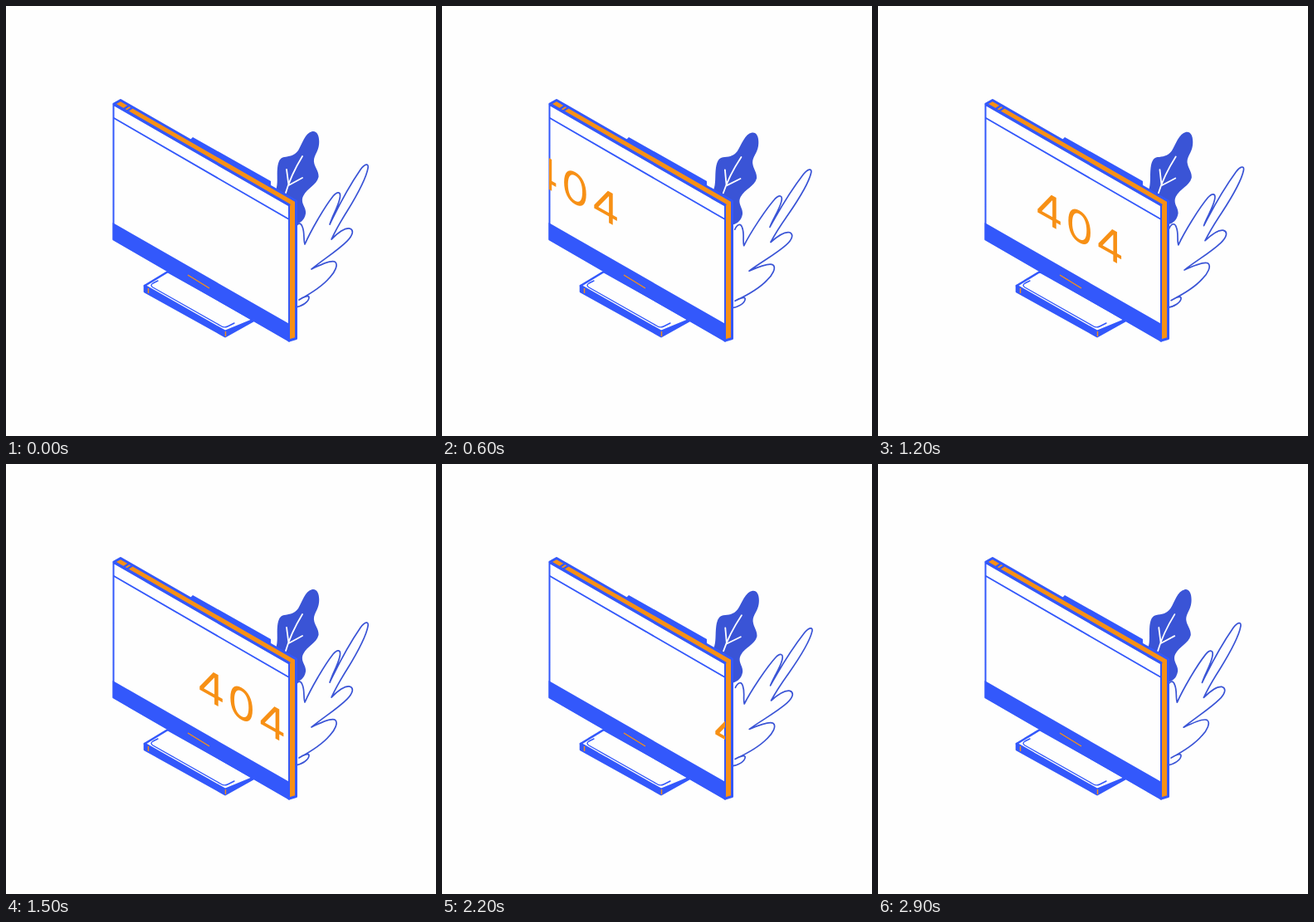
Recreate the animation shown at these times as an HTML page without scripts. Size 518x518 px, loop 3 s.

```html
<!DOCTYPE html>
<html lang="en">
<head>
<meta charset="utf-8">
<title>404 monitor</title>
<style>
  /* --t counts tenths of a second and drives every moving part */
  @property --t { syntax: "<number>"; inherits: true; initial-value: 0; }
  @keyframes tick { from { --t: 0; } to { --t: 30; } }

  html, body { margin: 0; width: 100%; height: 100%; overflow: hidden; background: #fefefe; }
  svg {
    --blue: #3358fb;
    --leaf: #3a54d6;
    --orange: #f79015;
    --paper: #fefefe;
    --sway: calc((1 - cos((var(--t) - 0.4) * 24deg)) / 2);
    display: block; width: 100%; height: 100%;
    animation: tick 3s steps(30) infinite;
  }
  .line { fill: none; stroke: var(--blue); stroke-linecap: round; stroke-linejoin: round; }
  .line.paper { fill: var(--paper); }
  .solid, .line.solid { fill: var(--blue); }
  .line.orange { fill: var(--orange); }
  .accent { fill: none; stroke: var(--orange); stroke-width: 1.4; }
  .broad { transform-origin: 330px 275px; transform: rotate(calc(var(--sway) * 2.5deg)); }
  .feather {
    stroke: var(--leaf);
    transform-origin: 330px 355px;
    transform: rotate(calc(var(--sway) * 3.7deg));
  }
  .message {
    font: 400 52px Inter, "Open Sans", sans-serif;
    letter-spacing: 3.5px;
    fill: var(--orange);
    transform: translateX(calc(var(--t) * 13.72px));
  }
</style>
</head>
<body>
<svg viewBox="0 0 518 518">
  <clipPath id="screen"><path d="M129 118 341 240V403L129 281Z"/></clipPath>

  <g class="broad">
    <path fill="var(--leaf)" d="M369 151C375 150 378 157 377 167C376 176 370 181 371 188C372 195 377 199 376.500 206C374 216 363 219 358 229C354 238 362 242 361 250C360 257 355 262 348 263L330 240L325 222C328 214 326 205 327 195C328 187 330 183 335 182C341 181 347 181 352 174C357 166 360 153 369 151Z"/>
    <path class="line" style="stroke: var(--paper)" stroke-width="1.8" d="M337 225Q343 204 357 181M338 197 340.500 216 357 207"/>
  </g>

  <path class="line paper feather" stroke-width="1.7" d="M348 268C351 261 355 260 357 266C360 273 358 281 360 287C367 271 383 243 394 229C399 223 404 223 402 232C400 242 393 253 390 263C400 242 416 213 427 197C432 190 437 189 436 195C434 207 422 229 411 247Q399 266 392 281C400 273 408 267 414 268C420 270 417 277 411 283C399 295 381 306 368 317C378 312 391 306 396 308C401 311 396 321 390 327C380 339 366 347 353 354C359 350 365 348 365 351C365 356 357 362 348 363"/>

  <!-- stand -->
  <g class="line" stroke-width="2.6">
    <path class="line solid" d="M167 337 264 392 298 379 264 398 167 344Z"/>
    <path class="line paper" d="M167 337 195 320 298 378 264 392Z"/>
    <path stroke-width="1.4" d="M183 331 177 334Q173 336.500 177 339L259 385.500Q263 388 267 386L275 382"/>
  </g>
  <path class="accent" d="M171.500 340V346M264.500 392V398"/>

  <!-- monitor -->
  <path class="solid" d="M222 161 225 158 319 211V217Z"/>
  <path class="line orange" stroke-width="3" d="M130 118 138 113.500 349.500 235V400.500L341 403Z"/>
  <path class="line" stroke-width="2.200" d="M142 124 148 120M146 126.500 152 122.500"/>
  <path class="line paper" stroke-width="2" d="M129.500 119 341 240.500V403L129.500 281Z"/>
  <path class="line" stroke-width="3" d="M131 118.500 341 239.500"/>
  <path class="line" stroke-width="1.800" d="M130 135 341 257"/>

  <g clip-path="url(#screen)">
    <g transform="skewY(29.300)">
      <text class="message" x="24.500" y="148.500">404</text>
    </g>
  </g>

  <path class="solid" d="M128.500 261 341.500 383V405L128.500 282Z"/>
  <path class="accent" d="M219 324 245 340"/>
</svg>
</body>
</html>
```
